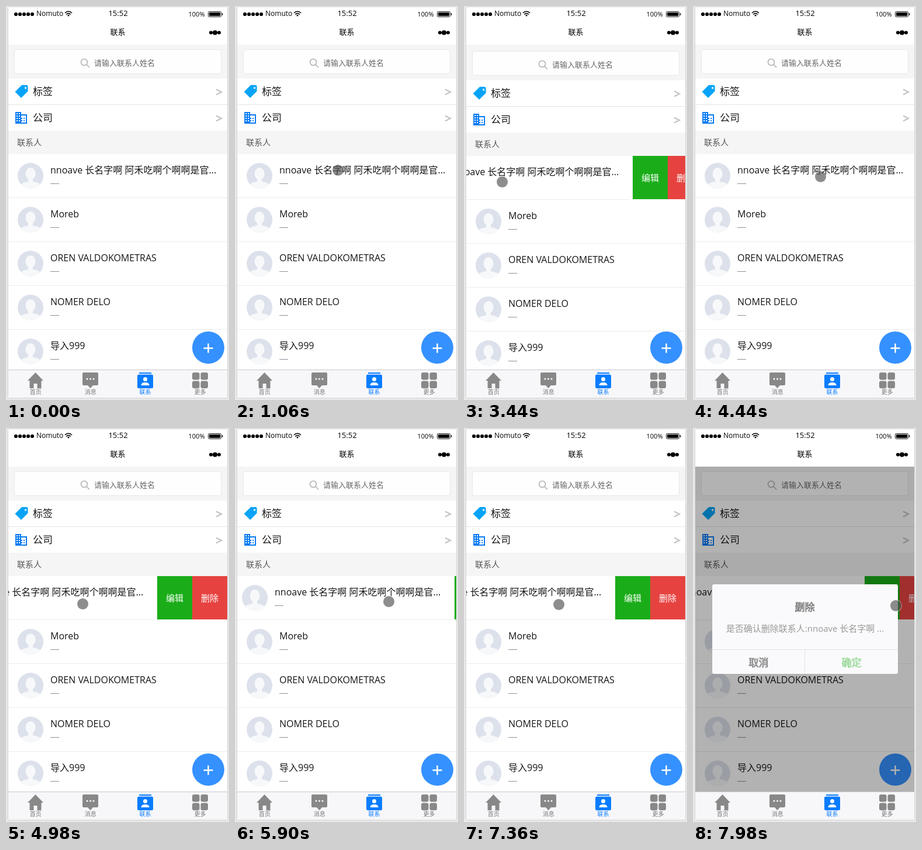
An HTML page for the animation above (8 s loop, 382 px wide and 673 px high).

```html
<!DOCTYPE html>
<html lang="zh-CN">
<head>
<meta charset="utf-8">
<title>联系</title>
<style>
  html, body { margin: 0; width: 100%; height: 100%; overflow: hidden; background: #eaeaea; }
  body { position: relative; font-family: "Open Sans", "Noto Sans CJK SC", "Noto Sans CJK", sans-serif; color: #161616; }
  body * { box-sizing: border-box; }
  .abs, .phone, .view, .row, .slide, .act, .avatar, .name, .dash, .dialog, .dialog *, #cursor, .chrome { position: absolute; white-space: nowrap; }
  .phone { left: 4px; top: 2px; width: 375px; height: 667px; background: #fff; box-shadow: 0 0 3px rgba(0,0,0,.18); }
  .view { left: 4px; top: 66px; width: 375px; height: 555px; overflow: hidden; background: #fff; }
  #page { position: absolute; left: 0; top: 0; width: 375px; }
  .band { left: 0; width: 375px; background: #f5f5f5; }
  .search { left: 10px; top: 8px; width: 355px; height: 42px; background: #fefefe; border: 1px solid #e8e8ea; border-radius: 4px; }
  .hint { left: 147px; top: 19px; font-size: 13px; line-height: 24px; color: #666; }
  .menu { left: 42px; font-size: 17px; line-height: 30px; }
  .line { left: 0; top: 102px; width: 375px; height: 1px; background: #e4e4e4; }
  .section { top: 147px; height: 40px; padding-left: 15px; font-size: 14px; line-height: 40px; color: #555; }
  .row { left: 0; width: 375px; height: 75px; overflow: hidden; background: #fff; }
  .slide { left: 0; top: 0; width: 375px; height: 75px; border-bottom: 1px solid #ececec; }
  .avatar { left: 16px; top: 15px; width: 44px; height: 44px; }
  .name { left: 72px; top: 15px; font-size: 16px; line-height: 24px; }
  .dash { left: 72px; top: 50px; width: 15px; height: 1px; background: #8b9299; }
  .act { top: 0; width: 60px; height: 74px; color: #fff; font-size: 15px; line-height: 74px; text-align: center; }
  .edit { background: #1aad19; }
  .del { background: #e64340; }
  #mask { left: 0; top: 0; width: 375px; height: 555px; background: rgba(0,0,0,.3); }
  .dialog { left: 33px; top: 267px; width: 318px; height: 153px; border-radius: 3px; background: #fafafc; text-align: center; }
  .dialog b { font-weight: 400; font-size: 17px; line-height: 30px; width: 159px; color: #fafafc; -webkit-text-stroke: .7px #555; }
  .dialog p { margin: 0; left: 0; top: 63px; width: 318px; font-size: 15px; line-height: 24px; color: #999; }
  .dialog i { background: #e3e3e8; }
  #cursor { left: -9px; top: -9px; width: 19px; height: 19px; border-radius: 50%; background: rgba(80,80,80,.65); }
  .pressed { box-shadow: 0 0 0 1px rgba(235,235,225,.55); }
  .chrome { left: 0; top: 0; }
</style>
</head>
<body>
<div class="phone"></div>

<div class="view">
  <div id="page">
    <div class="abs band" style="top:-10px;height:68px"></div>
    <div class="abs search"></div>
    <div class="abs hint">请输入联系人姓名</div>
    <div class="abs menu" style="top:65px">标签</div>
    <div class="abs menu" style="top:110px">公司</div>
    <div class="abs line"></div>
    <svg class="chrome" width="375" height="150" fill="none">
      <g stroke="#b0b0b0" stroke-width="1.5"><circle cx="130" cy="30" r="5.5"/><path d="M134 34l5 5"/></g>
      <path d="M356 76.500l9 4.500-9 4.500M356 121.500l9 4.500-9 4.500" stroke="#c4c4c9" stroke-width="2.300"/>
      <g transform="translate(33 69.500)">
        <path d="M-10 0H-1L0 1V10L-11 21-21 11z" fill="#06a3f6" stroke="#06a3f6" stroke-linejoin="round"/>
        <circle cx="-3.500" cy="4.500" r="1.700" fill="#fff"/>
      </g>
      <g transform="translate(12 115)" stroke-width="2" stroke-dasharray="2">
        <path d="M0 0h10v4h10v16H0z" fill="#0a7bf4"/>
        <path d="M3 2v16M7 2v16" stroke="#fff"/>
        <path d="M10 6h8v12h-8z" fill="#fff"/>
        <path d="M11 8v10M15 8v8" stroke="#0a7bf4" stroke-dashoffset="2"/>
      </g>
    </svg>
    <div class="abs band section">联系人</div>
    <div id="rows"></div>
  </div>
  <svg class="chrome" width="375" height="555">
    <circle cx="342.5" cy="517.5" r="27.5" fill="#3591ff"/>
    <path d="M334.500 518.500h16m-8-8v16" stroke="#fff" stroke-width="2.500"/>
  </svg>
  <div id="mask" class="abs"></div>
</div>

<svg class="chrome" width="382" height="673" text-anchor="middle">
  <g stroke="#000" stroke-linecap="round" fill="none">
    <path d="M17 14h28.100" stroke-width="6.200" stroke-dasharray="0 7"/>
    <path d="M351 45.500h14.100" stroke-width="6" stroke-dasharray="0 14"/>
    <path d="M358 45.500h.01" stroke-width="8"/>
    <path d="M101.500 11.500q5.500-4.500 11 0M103.500 14q3.500-2.800 7 0" stroke-width="1.600"/>
  </g>
  <path d="M105 15.700q2-1.400 4 0l-2 2.300z"/>
  <text x="52" y="17.300" font-size="12" text-anchor="start">Nomuto</text>
  <text x="192" y="17.300" font-size="13">15:52</text>
  <text x="326.500" y="17.600" font-size="11">100%</text>
  <rect x="346.5" y="9.5" width="22" height="9" rx="2" fill="none" stroke="#111"/>
  <rect x="348" y="11" width="19" height="6" rx="1"/><path d="M370 12h1q1 2 0 4h-1z"/>
  <text x="191.500" y="49" font-size="13">联系</text>

  <rect x="4" y="621" width="375" height="48" fill="#f7f7fa"/>
  <rect x="4" y="621" width="375" height="1" fill="#c9c9ce"/>
  <g fill="#888">
    <path d="M50.500 626L64 640h-3.500v13h-7v-8h-6v8h-7v-13H37z"/>
    <rect x="131" y="626" width="27" height="22" rx="2"/><path d="M140 648h9l-4.500 5z"/>
    <g id="tiles"></g>
  </g>
  <path d="M139 637h11.100" stroke="#fff" stroke-width="3" stroke-linecap="round" stroke-dasharray="0 5.500"/>
  <g fill="#0a7cff">
    <rect x="228" y="626" width="21" height="2"/>
    <rect x="225" y="629.500" width="27" height="23.500" rx="2.500"/>
  </g>
  <g fill="#fff"><circle cx="238.500" cy="637.500" r="3.500"/><path d="M231.500 648q0-5 7-5t7 5z"/></g>
  <g id="tabs" font-size="10"></g>
</svg>

<div class="dialog" id="dialog">
  <b style="left:79px;top:24px">删除</b>
  <p>是否确认删除联系人:nnoave 长名字啊 ...</p>
  <i style="left:0;top:111px;width:318px;height:1px"></i>
  <i style="left:158px;top:111px;width:1px;height:42px"></i>
  <b style="left:0;top:119px">取消</b>
  <b style="left:159px;top:119px;-webkit-text-stroke-color:#6fc96c">确定</b>
</div>
<div id="cursor"></div>

<script>
const LOOP = 8000, TICK = 1000 / 13, MENU = 120;
const $ = id => document.getElementById(id);
const clamp = (v, min, max) => Math.min(max, Math.max(min, v));
const ramp = (t, from, to) => clamp((t - from) / (to - from), 0, 1);
const mix = (a, b, p) => a + (b - a) * p;
const show = (el, on) => { el.style.visibility = on ? "visible" : "hidden"; };
const moveTo = (el, x, y) => { el.style.transform = `translate(${Math.round(x)}px, ${Math.round(y)}px)`; };

const names = ["nnoave 长名字啊 阿禾吃啊个啊啊是官...", "Moreb", "OREN VALDOKOMETRAS", "NOMER DELO",
  "导入999", "导入995", "导入994", "导入993", "导入992"];
const avatar = `<svg class="avatar" viewBox="0 0 44 44"><circle cx="22" cy="22" r="22" fill="#dce1eb"/>
  <g fill="#f6f8fa"><ellipse cx="22" cy="18.5" rx="8.5" ry="10.5"/><path d="M18 26h8v6q9 1 12.500 4.500A22 22 0 0 1 5.500 36.500Q9 33 18 32z"/></g></svg>`;
$("rows").innerHTML = names.map((name, i) =>
  `<div class="row" style="top:${187 + i * 75}px"><div class="slide">${avatar}<div class="name">${name}</div><div class="dash"></div></div></div>`
).join("");

const firstRow = document.querySelector(".row");
const slide = firstRow.firstChild;
firstRow.insertAdjacentHTML("beforeend", '<div class="act edit">编辑</div><div class="act del">删除</div>');
const [edit, del] = firstRow.querySelectorAll(".act");

$("tiles").innerHTML = [0, 1, 2, 3].map(i =>
  `<rect x="${319 + i % 2 * 14.5}" y="${626 + (i >> 1) * 14.5}" width="12.5" height="12.5" rx="3"/>`).join("");
$("tabs").innerHTML = ["首页", "消息", "联系", "更多"].map((label, i) =>
  `<text x="${50.8 + i * 93.9}" y="662.5" fill="${i === 2 ? "#0a7cff" : "#777"}">${label}</text>`).join("");

// Turning points of the pointer: time, x, y
const stops = [
  [440, 261, 661], [600, 136, 456], [1060, 176, 280], [1980, 176, 282], [2200, 176, 285], [2830, 271, 284],
  [3340, 35, 301], [3810, 176, 295], [4360, 190, 289], [4590, 270, 294], [4980, 131, 300], [5440, 146, 292],
  [5820, 270, 296], [6830, 187, 299], [7060, 82, 300], [7820, 347, 303]
];

function pointerAt(t) {
  const i = clamp(stops.findIndex(s => s[0] > t), 0, stops.length);
  const [from, to] = t >= stops.at(-1)[0] ? [stops.at(-1), stops.at(-1)] : [stops[Math.max(0, i - 1)], stops[i]];
  const p = from === to ? 0 : ramp(t, from[0], to[0]);
  return [mix(from[1], to[1], p), mix(from[2], to[2], p)];
}

// The row menu follows the pointer left of the place where each swipe took hold
function menuAt(t, x) {
  if (t < 2980) return 0;
  if (t > 7060) return t > 7950 ? 85 : MENU;
  const grip = t < 4000 ? 155 : t < 4550 ? 0 : t < 6250 ? 266 : 202;
  return Math.round(clamp(grip - x, 0, MENU));
}

function scrollAt(t) {
  const wheel = ramp(t, 1360, 1670) - ramp(t, 1980, 2290);
  const bounce = ramp(t, 2980, 3130) - ramp(t, 3600, 3750);
  return 3 * bounce - 225 * wheel;
}

function draw(now) {
  const tick = Math.floor((now % LOOP - 54) / TICK);
  const t = Math.round((57 + tick * TICK) / 10) * 10;
  const [x, y] = pointerAt(t);
  const open = menuAt(t, x);
  const confirm = t > 7950;

  moveTo($("cursor"), x, y);
  show($("cursor"), t >= 440);
  $("cursor").classList.toggle("pressed", confirm);
  moveTo($("page"), 0, scrollAt(t));
  moveTo(slide, open ? -open - 5 : 0, 0);
  edit.style.left = 375 - open + "px";
  del.style.left = 435 - open + "px";
  show($("mask"), confirm);
  show($("dialog"), confirm);
}

const start = performance.now();
function loop() {
  draw(performance.now() - start);
  requestAnimationFrame(loop);
}
loop();
</script>
</body>
</html>
```
